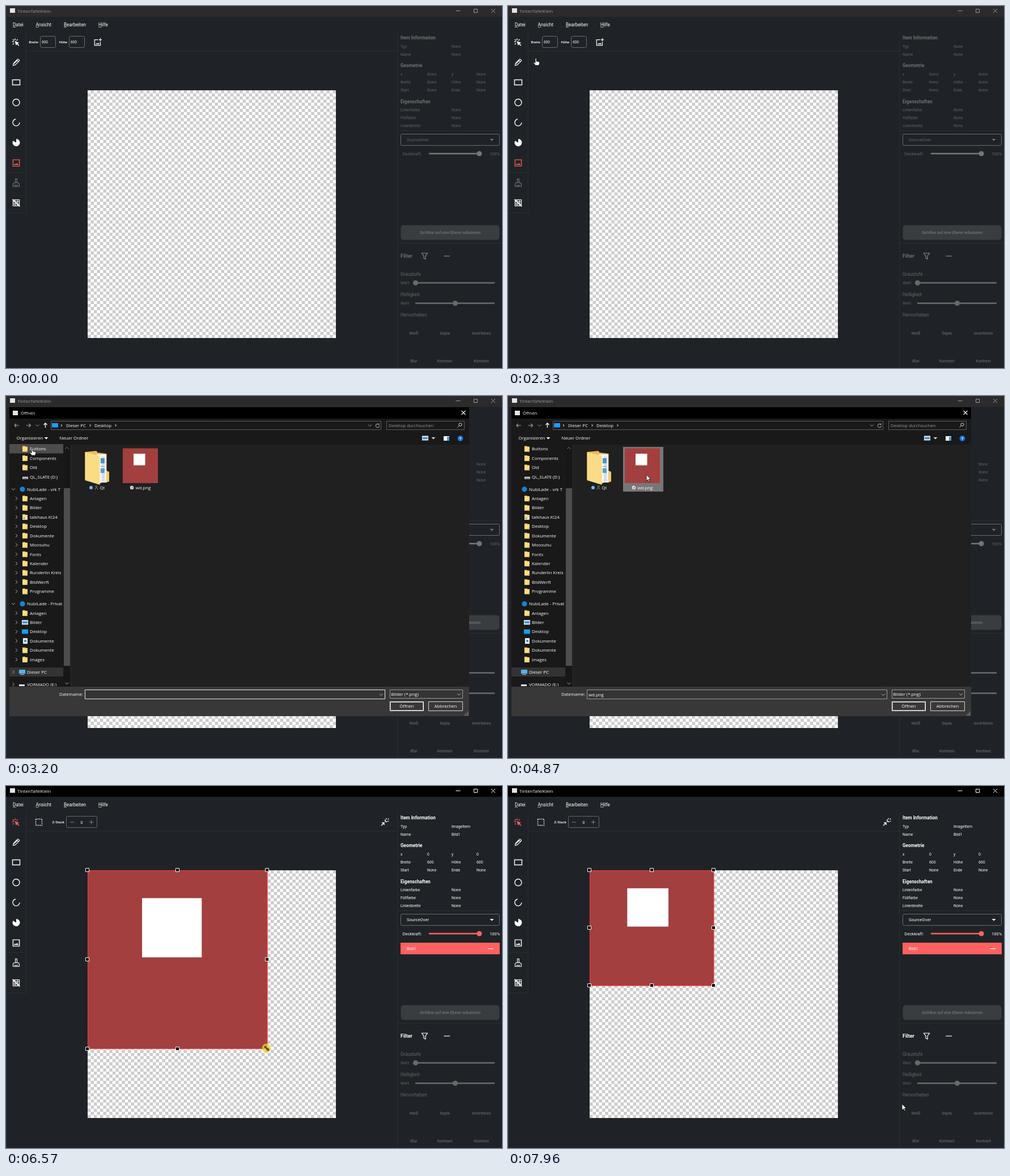
Recreate the animation shown at these times as an HTML page with a canvas. Size 875x640 px, loop 8 s.

```html
<!DOCTYPE html>
<html lang="de">
<head>
<meta charset="utf-8">
<title>TintenTafelKlein</title>
<style>
html, body { margin: 0; width: 875px; height: 640px; overflow: hidden; background: #1f2327; }
canvas { display: block; }
</style>
</head>
<body>
<canvas id="stage" width="875" height="640"></canvas>
<script>
const LOOP = 8000;
const stage = document.getElementById('stage').getContext('2d');
let ctx = stage;
const ROBOTO = 'Roboto, sans-serif', SYSTEM = '"Open Sans", "Noto Sans", sans-serif';
const BG = '#1f2327', WHITE = '#ffffff', DIM = '#606366', ACCENT = '#ff6161', RULE = '#2a2e32';

const clamp = v => Math.max(0, Math.min(1, v));
const smooth = u => u * u * (3 - 2 * u);
const easeIn = u => u * u;
const easeOut = u => 1 - (1 - u) * (1 - u);
const linear = u => u;
const mix = (a, b, u) => a + (b - a) * u;
const between = (t, a, b) => t >= a && t < b;

// ---- drawing helpers ----
function newLayer(w, h) {
  const canvas = document.createElement('canvas');
  canvas.width = w;
  canvas.height = h;
  return canvas.getContext('2d');
}
function box(x, y, w, h, color) {
  ctx.fillStyle = color;
  ctx.fillRect(x, y, w, h);
}
function frame(x, y, w, h, color, radius = 0, fill) {
  ctx.beginPath();
  ctx.roundRect(x + .5, y + .5, w - 1, h - 1, radius);
  if (fill) { ctx.fillStyle = fill; ctx.fill(); }
  if (color) { ctx.strokeStyle = color; ctx.lineWidth = 1; ctx.stroke(); }
}
function dot(x, y, r, color) {
  ctx.fillStyle = color;
  ctx.beginPath();
  ctx.arc(x, y, r, 0, Math.PI * 2);
  ctx.fill();
}
function icon(d, x, y, { stroke, fill, width = 1.4, scale = 1 }) {
  const path = new Path2D(d);
  ctx.save();
  ctx.translate(x, y);
  ctx.scale(scale, scale);
  if (fill) { ctx.fillStyle = fill; ctx.fill(path); }
  if (stroke) { ctx.strokeStyle = stroke; ctx.lineWidth = width; ctx.stroke(path); }
  ctx.restore();
}
// y is the middle of the capital letters
function text(s, x, y, size, color, { family = ROBOTO, weight = 400, align = 'left' } = {}) {
  ctx.font = `${weight} ${size}px ${family}`;
  ctx.textAlign = align;
  ctx.fillStyle = color;
  ctx.fillText(s, x, y + size * .36);
}
const sysText = (s, x, y, color = WHITE, align) => text(s, x, y, 7.8, color, { family: SYSTEM, align });

const CHEVRON = { right: 'M-1.5-3L1.5 0L-1.5 3', down: 'M-3-1.5L0 1.5L3-1.5', up: 'M-3 1.5L0-1.5L3 1.5' };
const chevron = (dir, x, y, color = '#b0b0b0') => icon(CHEVRON[dir], x, y, { stroke: color, width: 1 });
const caretDown = (x, y, color) => icon('M-3.5-1.5h7L0 2z', x, y, { fill: color });

const board = newLayer(438, 438);
{
  const n = 80, cell = 438 / n;
  board.fillStyle = '#fff';
  board.fillRect(0, 0, 438, 438);
  board.fillStyle = '#cbcbcb';
  for (let r = 0; r < n; r++)
    for (let c = (r + 1) % 2; c < n; c += 2) board.fillRect(c * cell, r * cell, cell, cell);
}

// ---- paint program ----
function drawTitle(active) {
  const color = active ? WHITE : '#9a9a9a';
  box(0, 0, 875, 19, active ? '#000' : '#2b2b2b');
  box(7, 4, 9, 8, '#e4e4e4');
  text('TintenTafelKlein', 20, 9, 8, color, { family: SYSTEM });
  icon('M-4 0h8', 797.5, 8.5, { stroke: color, width: 1 });
  frame(825, 5, 7, 7, color);
  icon('M-3.5-3.5l7 7M3.5-3.5l-7 7', 859.5, 8.5, { stroke: color, width: 1 });
}

function drawMenuBar(open) {
  if (open) box(1, 19, 41, 27, '#4f5255');
  for (const [label, x] of [['Datei', 12], ['Ansicht', 52.5], ['Bearbeiten', 102], ['Hilfe', 163]]) {
    text(label, x, 33, 8.2, WHITE);
    box(x, 37, ctx.measureText(label[0]).width, .8, '#c8c8c8');
  }
}

function drawTools(selecting) {
  const pick = selecting ? ACCENT : WHITE, image = selecting ? WHITE : '#f0604f';
  const x = 18, line = { stroke: WHITE };
  icon('M-2-2L6 1L2.8 2.3L6 5.5L4.8 6.5L1.7 3.4L.3 6z', x - .5, 64, { fill: pick });
  icon('M-1.5-6.5v3M-5.5-5l2 2M-6.5-1h3M-5.5 4l2-2M3-5l-2 2', x - .5, 64, { stroke: pick });
  icon('M-5.5 5.5l.8-3.8L2.3-5.3Q3-6 3.8-5.3L5.3-3.8Q6-3 5.3-2.3L-1.7 4.7zM1-4l3 3M-4 2.5L2-3.5', x, 99.5,
    { stroke: WHITE, width: 1.2 });
  icon('M-6.5-4.5h13v9h-13z', x, 135, line);
  icon('M6 0A6 6 0 1 1-6 0A6 6 0 1 1 6 0', x, 170.5, line);
  icon('M-1-6A6 6 0 1 0 6 0', x, 206, line);
  icon('M0 0L0-6.5A6.5 6.5 0 1 1-5.6-3.3z', x, 241.5, { fill: WHITE });
  icon('M-9-9H9V9H-9zM-7-7V7H7V-7zM2.1-.1L-.9 3.7L-3 1.1L-6 5H6z', x, 277.5, { fill: image, scale: .7 });
  icon('M-1.4-7h2.8v7h-2.8zM-5.5 6.5v-3.5Q-5.5 0-2.5 0h5Q5.500 0 5.500 3v3.500zM-2.3 3.5v3M0 3.5v3M2.3 3.5v3', x, 312.5,
    { stroke: selecting ? WHITE : '#77797b', width: 1.1 });
  icon('M-5.5-5.5h11v11h-11zM-2-5.5v11M2-5.5v11M-5.5-2h11M-5.5 2h11M-6.5-6.5l13 13', x, 348,
    { stroke: WHITE, width: 1.2 });
}

function drawToolbar(selecting) {
  if (selecting) {
    ctx.setLineDash([1.6, 1.4]);
    icon('M-5.5-5.5h11v11h-11z', 58, 64, { stroke: WHITE });
    ctx.setLineDash([]);
    text('Z-Stack', 81.5, 64, 6.2, WHITE, { weight: 500 });
    frame(106, 53, 55, 21, '#66696c', 2);
    icon('M-3.5 0h7M30.5 0h7M34-3.5v7', 116.5, 64, { stroke: '#85888a', width: 1 });
    text('0', 133.5, 64, 7, WHITE, { align: 'center' });
    icon('M-6 6L-1 1M-5 1h4v4M1-1L1-5M1-1h4', 668, 64, { stroke: WHITE });
    ctx.setLineDash([2, 2]);
    icon('M2-6h4.5v5', 668, 64, { stroke: WHITE });
    ctx.setLineDash([]);
    return;
  }
  for (const [label, x] of [['Breite', 40.5], ['Höhe', 93.5]]) text(label, x, 64, 6.2, WHITE, { weight: 500 });
  for (const x of [60, 111]) {
    frame(x, 53, 28, 21, '#6c6f72', 3);
    text('600', x + 3, 64, 6.4, WHITE);
  }
  icon('M1-8h-11V10H8V-1H6V8H-8V-6H1zM-1.8 4.8L-3.8 2.5L-6.5 6h11L1 1.3zM6-11h2v3h3v2h-3v3h-2v-3h-3v-2h3z', 162, 64,
    { fill: WHITE, scale: .63 });
}

function slider(x0, x1, y, knob, color) {
  box(x0, y - 1.3, x1 - x0, 2.6, color);
  dot(knob, y, 4.6, color);
}

function drawPanel(filled) {
  const main = filled ? WHITE : DIM, head = filled ? WHITE : '#6c6f71', grey = '#626466';
  const val = v => filled ? v : 'None';
  const row = (y, ...cells) => cells.forEach(([s, x]) => text(s, x, y, 6.9, main));
  const heading = (s, y) => text(s, 696, y, 8.2, head, { weight: 700 });
  heading('Item Information', 56.5);
  row(72, ['Typ', 696], [val('ImageItem'), 786]);
  row(86, ['Name', 696], [val('Bild1'), 786]);
  heading('Geometrie', 105.5);
  row(120.5, ['x', 696], [val('0'), 743], ['y', 786], [val('0'), 830]);
  row(135, ['Breite', 696], [val('600'), 743], ['Höhe', 786], [val('600'), 830]);
  row(149, ['Start', 696], ['None', 743], ['Ende', 786], ['None', 830]);
  heading('Eigenschaften', 169);
  row(184, ['Linienfarbe', 696], ['None', 786]);
  row(198, ['Füllfarbe', 696], ['None', 786]);
  row(212, ['Linienbreite', 696], ['None', 786]);
  frame(696, 226, 175, 21, '#6a6d70', 2);
  text('SourceOver', 707, 236.5, 7.6, main);
  caretDown(857, 236.5, filled ? WHITE : '#75787a');
  text('Deckkraft:', 699.5, 261, 7.5, main);
  slider(746, 836, 261, 835, filled ? ACCENT : '#737577');
  text('100%', 853, 261, 7.5, main);
  if (filled) {
    box(696, 277, 175, 20.5, ACCENT);
    text('Bild1', 707, 287.5, 7.5, WHITE);
    box(850, 287, 10, 1.2, WHITE);
  }
  frame(696, 387, 175, 27, null, 5, '#3a3d40');
  text('Sichtbar auf eine Ebene reduzieren', 783.5, 400.5, 6.9, '#727577', { weight: 500, align: 'center' });
  text('Filter', 696, 442, 9, head, { weight: 700 });
  icon('M-5-5h10L1.5 0v5.5l-3-1.5V0z', 738.5, 442, { stroke: filled ? WHITE : '#85888a', width: 1.2 });
  box(772.5, 441.5, 10.5, 1.2, filled ? WHITE : '#85888a');
  text('Graustufe', 696, 474, 8.2, grey);
  text('Helligkeit', 696, 510, 8.2, grey);
  text('Hervorheben', 696, 546.5, 8.2, grey);
  for (const [y, knob] of [[489.5, 722.5], [525.5, 792.5]]) {
    text('Wert', 696, y, 7.2, grey);
    slider(722, 862, y, knob, '#67696b');
  }
  [['Weiß', 'Sepia', 'Invertieren'], ['Blur', 'Kontrast', 'Kontrast']].forEach((names, r) =>
    names.forEach((s, c) => text(s, [719.5, 774, 838.5][c], 578 + r * 49, 7, grey, { weight: 500, align: 'center' })));
}

function drawPicture(w, h) {
  const x = 144, y = 149;
  box(x, y, w, h, '#a33f3f');
  box(x + w * .303, y + h * .156, w * .332, h * .332, WHITE);
  ctx.lineWidth = 1;
  ctx.strokeStyle = '#ff0000';
  ctx.strokeRect(x + .5, y + .5, w - .5, h - .5);
  ctx.setLineDash([1, 2]);
  ctx.strokeStyle = '#ffb0b0';
  ctx.strokeRect(x + .5, y + .5, w - .5, h - .5);
  ctx.setLineDash([]);
  for (let i = 0; i < 9; i++) {
    if (i === 4) continue;
    const hx = Math.round(x + w * (i % 3) / 2), hy = Math.round(y + h * Math.floor(i / 3) / 2);
    frame(hx - 4, hy - 4, 7, 7, WHITE, 0, '#000');
  }
}

function drawFileMenu(pointerY) {
  box(1, 46, 137, 144, BG);
  box(1, 190, 137, 2, '#1a1d20');
  if (pointerY > 46) box(1, pointerY < 79 ? 46 : 79, 137, 33, '#34383b');
  box(1, 151, 137, 1, '#44474a');
  for (const [label, y] of [['Neu', 63], ['Öffnen', 96], ['Speichern', 128.5], ['Beenden', 173]])
    text(label, 11.5, y, 8.2, label === 'Speichern' ? DIM : WHITE);
}

function drawApp(t, cursor) {
  const selecting = t >= 5080, menu = between(t, 1090, 2120);
  box(0, 0, 875, 640, BG);
  box(0, 19, 1, 621, '#31393e');
  drawTitle(menu || selecting);
  drawMenuBar(between(t, 980, 2120));
  box(35, 46, 1, 319, RULE);
  box(1, 294, 34, 1, RULE);
  box(1, 365, 35, 1, RULE);
  box(35, 79, 655, 1, RULE);
  box(690, 46, 1, 594, RULE);
  box(691, 220, 184, 1, RULE);
  box(691, 419, 184, 1, RULE);
  drawTools(selecting);
  drawToolbar(selecting);
  drawPanel(selecting);
  ctx.drawImage(board.canvas, 144, 149);
  if (selecting) {
    const u = smooth(clamp((t - 6600) / 880));
    drawPicture(mix(317, 219, u), mix(315.5, 204, u));
  }
  if (menu) drawFileMenu(cursor.y);
}

// ---- file dialog ----
const NAV = [
  ['Buttons'], ['Components'], ['Old'], ['QL_SLATE (D:)', 'disk'],
  ['NubiLade - vrk T', 'cloud'], ['Anlagen'], ['Bilder'], ['talkhaus K!24', 'people'], ['Desktop'],
  ['Dokumente'], ['Moosuhu'], ['Fonts'], ['Kalender'], ['Runderlin Kreis'], ['BildWerft'], ['Programme'],
  ['NubiLade - Privat', 'cloud'], ['Anlagen'], ['Bilder', 'picture'], ['Desktop', 'screen'],
  ['Dokumente', 'doc'], ['Dokumente'], ['images'],
  ['Dieser PC', 'computer'], ['VORMADO (E:)', 'usb']
];
const NAV_ICONS = {
  folder(x, y) { box(x, y - 5, 5, 2, '#e8bd55'); box(x, y - 4, 9, 9, '#ffdc7c'); box(x + 7, y + 2, 2, 3, '#e8bd55'); },
  disk(x, y) { box(x, y, 10, 4, '#d8d8d8'); box(x + 1, y + 2, 8, 1, '#555'); },
  usb(x, y) { box(x, y, 10, 4, '#e4e4e4'); },
  cloud(x, y) { dot(x + 6, y, 4.6, '#1583d8'); },
  people(x, y) { this.folder(x, y); dot(x + 3, y + 2, 2, '#8fb4d8'); dot(x + 7, y + 2, 2, '#e8f0f8'); },
  picture(x, y) { box(x - 1, y - 4, 11, 8, '#f0f4f8'); box(x, y - 2, 9, 4, '#3f8fd0'); },
  screen(x, y) { box(x - 1, y - 4, 11, 8, '#1f9bf0'); box(x - 1, y + 3, 11, 1, '#0b63b0'); },
  doc(x, y) { box(x + 1, y - 5, 8, 10, '#eef2f5'); box(x + 3, y - 2, 4, 4, '#4a90c8'); },
  computer(x, y) { box(x, y - 4, 11, 7, '#53b5ee'); box(x + 2, y + 4, 7, 1, '#d0d0d0'); }
};

function drawNav(t) {
  const fade = 1 - clamp((t - 4380) / 210);
  ctx.save();
  ctx.beginPath();
  ctx.rect(6, 85, 96, 428);
  ctx.clip();
  if (t < 3480) box(6, 85, 95, 16.5, '#4d4d4d');
  box(6, 480, 95, 16, '#333');
  let y = 93.5;
  NAV.forEach(([label, kind = 'folder'], i) => {
    const top = ['cloud', 'computer', 'usb'].includes(kind);
    if (i) y += top ? 22 : 16.42;
    NAV_ICONS[kind](top ? 23 : 29, y);
    sysText(label, top ? 37 : 42, y);
    if (i < 4) return;
    ctx.globalAlpha = fade;
    chevron(kind === 'cloud' ? 'down' : 'right', top ? 13 : 18.5, y);
    ctx.globalAlpha = 1;
  });
  ctx.restore();
  box(102, 86, 11, 427, '#171717');
  box(102, 163, 11, 314, '#4d4d4d');
  chevron('up', 107.5, 92, '#888');
  chevron('down', 107.5, 508, '#aaa');
  box(114, 86, 1, 427, '#2b2b2b');
}

function drawFiles(t) {
  const selected = t >= 4520;
  if (t >= 3980) box(203, 90, 71, 79, selected ? '#777' : '#4d4d4d');
  icon('M0 2L20 0L22 3L38 5V52L26 58L0 50z', 139.5, 97, { fill: '#e8bd58' });
  box(160, 103, 17, 50, '#f3f4f5');
  icon('M0 0l5 1v44l-5-1z', 169, 107, { fill: '#d5dde5' });
  box(167, 110, 7, 9, '#4f91c6');
  box(167, 124, 7, 1, '#7aa6cc');
  box(167, 128, 7, 8, '#5c9bcb');
  icon('M0 0L26 7V58L0 50z', 139.5, 99, { fill: '#fbdc86' });
  icon('M0 0l5 2v17l-5 2z', 177, 132, { fill: '#f2cb68' });
  dot(150, 162, 3, '#79b8ee');
  icon('M1.5-2A1.5 1.5 0 1 1-1.5-2A1.5 1.5 0 1 1 1.5-2M-2.5 3.5q0-3 2.5-3t2.5 3', 159.5, 162, { stroke: '#999', width: .8 });
  sysText('Qt', 165.5, 162);
  box(206, 92.5, 62, 61.5, '#a33f3f');
  box(225, 102, 20.5, 20.5, WHITE);
  dot(222, 162, 3.2, '#e6e6e6');
  icon('M-1.6 0l1.2 1.3l2-2.6', 222, 162, { stroke: '#333', width: .9 });
  sysText('wd.png', 228.5, 162);
}

function drawDialogTitle() {
  box(6, 20, 811, 20, '#000');
  box(12, 26, 9, 8, '#e4e4e4');
  sysText('Öffnen', 26, 30);
  icon('M-3.5-3.5l7 7M3.5-3.5l-7 7', 807, 29.5, { stroke: WHITE, width: 1.1 });
}

function drawDialog(t) {
  const selected = t >= 4520, edge = '#5c5c5c', soft = { stroke: '#a0a0a0', width: 1.1 };
  box(6, 40, 811, 474, '#191919');
  box(114, 86, 703, 428, '#202020');
  drawDialogTitle();
  icon('M4 0h-8M-1-3L-4 0L-1 3', 19, 52, soft);
  icon('M-4 0h8M1-3L4 0L1 3', 39.5, 52, soft);
  chevron('down', 55.5, 52, '#909090');
  icon('M0 4v-8M-3-1L0-4L3-1', 69.5, 52, { stroke: WHITE, width: 1.3 });
  frame(79, 44, 583, 16, edge);
  NAV_ICONS.screen(82, 52);
  for (const x of [98, 148.5, 193.5]) icon('M-1-2L1 0L-1 2', x, 52, { stroke: WHITE, width: 1 });
  sysText('Dieser PC', 106, 52);
  sysText('Desktop', 156, 52);
  chevron('down', 642, 52, '#a0a0a0');
  icon('M2-2.5A3.2 3.2 0 1 0 3.2 0M2.5-4v2h-2', 655.5, 52.5, soft);
  frame(671, 44, 138, 16, edge);
  sysText('Desktop durchsuchen', 675, 52, '#999');
  icon('M4-1.5A2.6 2.6 0 1 1-1.2-1.5A2.6 2.6 0 1 1 4-1.5M-.5.5l-3 3', 800, 52, { stroke: '#ddd', width: 1 });
  sysText('Organisieren', 18.5, 74.5);
  caretDown(71, 74.5, WHITE);
  sysText('Neuer Ordner', 94.5, 74.5);
  NAV_ICONS.picture(735, 74.5);
  caretDown(754, 74.5, '#ddd');
  box(772, 71, 10, 8, WHITE);
  box(778, 72, 4, 7, '#4a9ad8');
  dot(801.5, 75, 5, '#1672d6');
  text('?', 801.5, 75, 8, WHITE, { align: 'center', weight: 700 });
  drawNav(t);
  drawFiles(t);

  box(6, 514, 811, 52, '#383838');
  sysText('Dateiname:', 136, 527.5, WHITE, 'right');
  frame(139, 519, 530, 17, selected ? '#9b9b9b' : '#e8e8e8', 0, '#343434');
  chevron('down', 662, 528);
  if (selected) sysText('wd.png', 142, 528);
  else if (t < 3190 || between(t, 3710, 4240)) box(142, 523, 1, 10, WHITE);
  frame(677, 519, 129, 16, '#9b9b9b', 0, '#343434');
  sysText('Bilder (*.png)', 679.5, 527.5);
  chevron('down', 799, 527.5);
  frame(677, 540, 60, 17, WHITE);
  frame(678, 541, 58, 15, '#a0a0a0');
  frame(745, 540, 61, 17, '#d8d8d8');
  sysText('Öffnen', 707, 548, WHITE, 'center');
  sysText('Abbrechen', 775.5, 548, WHITE, 'center');
  for (let r = 0; r < 3; r++)
    for (let c = 0; c <= r; c++) box(814 - c * 2.5, 558.5 + r * 2.5, 1.3, 1.3, '#bbb');
}

function drawEmptyDialog() {
  box(6, 40, 811, 474, WHITE);
  drawDialogTitle();
  box(101, 86, 11.5, 428, '#171717');
  box(101, 162, 11.5, 315, '#4d4d4d');
  chevron('up', 107, 92, '#888');
  chevron('down', 107, 508, '#888');
  box(6, 513.5, 811, 53, '#383838');
  box(95, 523, 41, 9, '#f0f0f0');
  box(140, 519.5, 528, 16, WHITE);
  box(677, 519.5, 128, 16, '#f4f4f4');
  box(677, 539, 60, 17, '#f2eaf5');
  box(745, 539, 60, 17, '#f2eaf5');
  box(805, 553, 12, 12, '#e8e8e8');
}

// the dialog is painted on its own layer so that it fades and scales as one
const dialogLayer = newLayer(875, 640);
function drawDialogLayer(t) {
  if (!between(t, 2440, 5080)) return;
  const shown = Math.min(clamp((t - 2440) / 160), clamp((5080 - t) / 120));
  const scale = .95 + .05 * shown;
  ctx = dialogLayer;
  ctx.clearRect(0, 0, 875, 640);
  if (t < 2680) drawEmptyDialog();
  else drawDialog(t);
  ctx = stage;
  ctx.save();
  ctx.globalAlpha = shown;
  ctx.translate(411.5, 293);
  ctx.scale(scale, scale);
  ctx.drawImage(dialogLayer.canvas, -411.5, -293);
  ctx.restore();
}

// ---- pointer ----
const PATH = [
  [250, 704, 549], [1020, 18, 27, smooth], [1380, 18, 27, linear], [1920, 49, 92, smooth], [2950, 49, 92, linear],
  [3190, 46, 92, smooth], [3400, 46, 92, linear], [4170, 244, 139, smooth], [4950, 244, 139, linear],
  [5490, 401, 393, easeIn], [5970, 467, 469, easeOut], [6300, 467, 469, linear], [6370, 459.5, 464, smooth],
  [6600, 459.5, 464, linear], [7480, 361.5, 352.5, smooth], [7550, 361.5, 352.5, linear],
  [7890, 590, 495, easeIn], [7960, 695, 562, linear], [LOOP, 695, 562, linear]
];
function pointerAt(t) {
  const i = Math.max(1, PATH.findIndex(p => p[0] > t));
  const [t0, x0, y0] = PATH[i - 1], [t1, x1, y1, ease] = PATH[i];
  const u = ease(clamp((t - t0) / (t1 - t0)));
  return { x: mix(x0, x1, u), y: mix(y0, y1, u) };
}

const ARROW = 'M0 0V11L2.5 8.7L4.3 12.5L6 11.7L4.3 8H7.7z';
const HAND = 'M-1 1Q0-1 1.2 1V5.5L5.5 6.5Q7 7 6.8 9L5.5 13H-.5L-4.3 8.5Q-3.5 6.5-1 9z';
const RESIZE = 'M-4-4h4l-1.3 1.3l4 4L4 0v4H0l1.3-1.3l-4-4L-4 0z';

function drawPointer(t, { x, y }) {
  if (t < 250) return;
  if (between(t, 6340, 7500)) {
    ctx.globalAlpha = .75;
    dot(x, y - .5, 8, '#f5d432');
    ctx.globalAlpha = 1;
    icon(RESIZE, x + .5, y, { fill: '#4a4212', stroke: '#6d611d', width: .6 });
  } else {
    icon(between(t, 1600, 3470) ? HAND : ARROW, x, y, { fill: WHITE, stroke: '#000', width: .8 });
  }
}

function render(now) {
  const t = now % LOOP, pointer = pointerAt(t);
  drawApp(t, pointer);
  drawDialogLayer(t);
  drawPointer(t, pointer);
}
const start = performance.now();
function tick() {
  render(performance.now() - start);
  requestAnimationFrame(tick);
}
tick();
</script>
</body>
</html>
```
